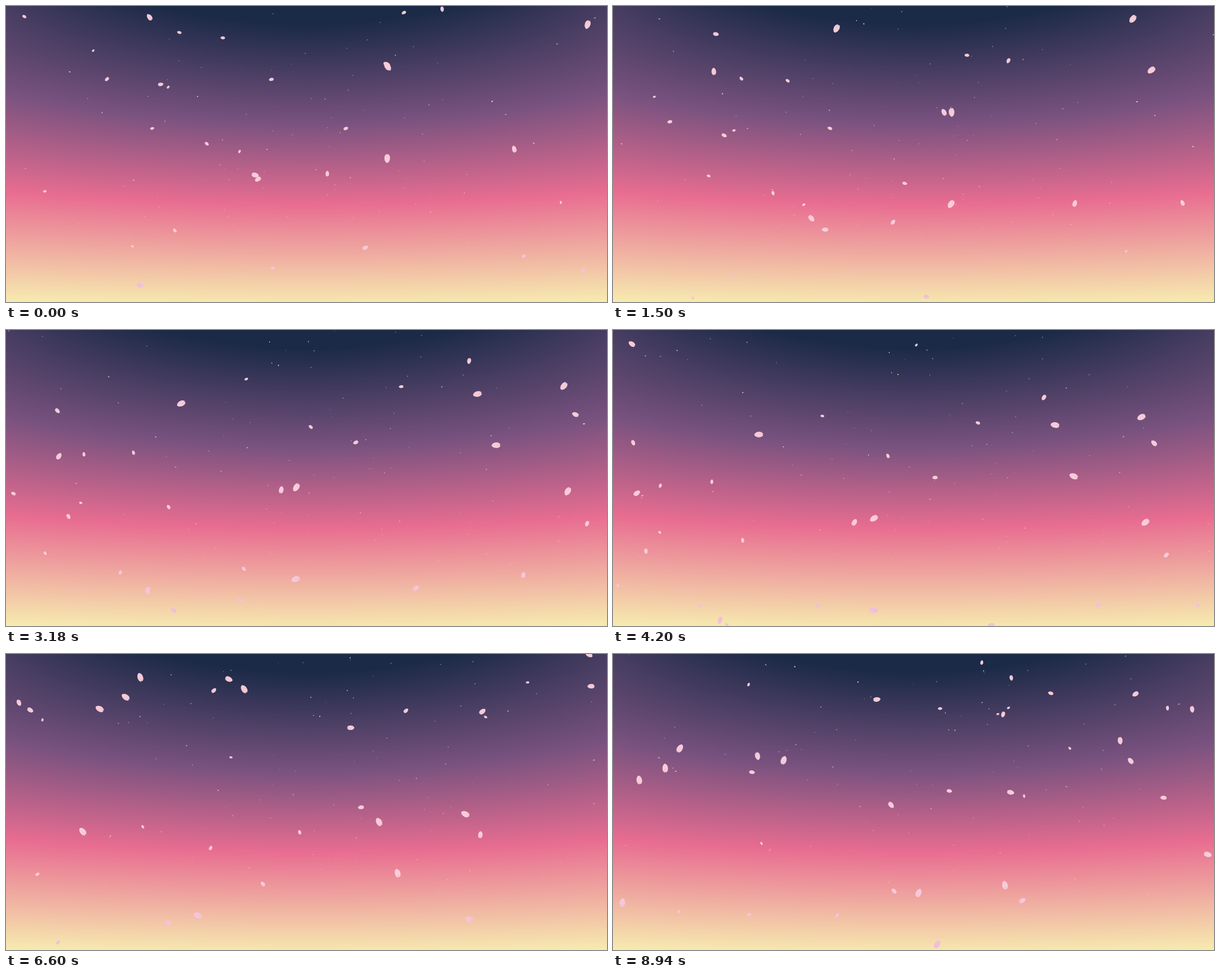
Animation of 1065 by 526 pixels, one loop 9 s. Source, as an HTML page with a canvas:

```html
<!DOCTYPE html>
<html lang="en">
<head>
<meta charset="utf-8">
<title>Petals at dusk</title>
<style>
  html, body { margin: 0; width: 100%; height: 100%; overflow: hidden; background: #1b2a47; }
  canvas { display: block; width: 1065px; height: 526px; }
</style>
</head>
<body>
<canvas id="sky" width="1065" height="526"></canvas>
<script>
const W = 1065, H = 526, CX = W / 2, CY = H / 2;
const LOOP = 9000, STEP = 60, MID = LOOP / 2000;
const FOCAL = CY / Math.tan(37.5 * Math.PI / 180);
const ctx = document.getElementById('sky').getContext('2d');

function seeded(seed) {
  return () => {
    seed = seed + 0x6D2B79F5 | 0;
    let n = Math.imul(seed ^ seed >>> 15, 1 | seed);
    n = n + Math.imul(n ^ n >>> 7, 61 | n) ^ n;
    return ((n ^ n >>> 14) >>> 0) / 4294967296;
  };
}
const rand = seeded(11);
const between = (a, b) => a + (b - a) * rand();
const clamp = v => Math.min(1, Math.max(0, v));

// ---- Sky: a vertical ramp bent upwards at both sides ----
const ramp = [
  { y: 33, rgb: [27, 42, 71] },
  { y: 207, rgb: [121, 82, 127] },
  { y: 352, rgb: [232, 109, 145] },
  { y: 540, rgb: [247, 240, 177] }
];

function rampColor(y) {
  const i = Math.max(1, ramp.findIndex((s, n) => s.y >= y || n === ramp.length - 1));
  const a = ramp[i - 1], b = ramp[i];
  const k = clamp((y - a.y) / (b.y - a.y));
  return a.rgb.map((v, n) => v + (b.rgb[n] - v) * k);
}

function bend(x, y) {
  return 115 * Math.exp(-y / 200) * Math.pow(Math.abs(x - CX) / CX, 1.7);
}

function paintSky() {
  const layer = document.createElement('canvas');
  layer.width = W;
  layer.height = H;
  const c = layer.getContext('2d');
  const img = c.createImageData(W, H);
  let p = 0;
  for (let y = 0; y < H; y++) {
    for (let x = 0; x < W; x++) {
      for (const v of rampColor(y + bend(x, y))) img.data[p++] = Math.round(v);
      img.data[p++] = 255;
    }
  }
  c.putImageData(img, 0, 0);

  // Faint arc across the dome
  c.strokeStyle = 'rgba(115, 105, 160, 0.25)';
  c.lineWidth = 0.8;
  c.beginPath();
  for (let x = 0; x <= W; x += 15) {
    c.lineTo(x, 257.5 - 40 * Math.pow(Math.abs(x - CX - 10) / CX, 1.8));
  }
  c.stroke();
  return layer;
}

// ---- Stars: spread over a sphere that turns about a fixed axis ----
const SPIN = [0.031, 0.0675, 0.012];
const RATE = Math.hypot(...SPIN);
const AXIS = SPIN.map(v => v / RATE);

const stars = Array.from({ length: 640 }, () => {
  const z = between(-1, 1), around = between(0, 2 * Math.PI), r = Math.sqrt(1 - z * z);
  return {
    dir: [r * Math.cos(around), r * Math.sin(around), z],
    size: between(0.45, 0.95),
    alpha: between(0.4, 1),
    warm: rand() < 0.15
  };
});

function turn([x, y, z], angle) {
  const [a, b, c] = AXIS, cos = Math.cos(angle), sin = Math.sin(angle);
  const k = (a * x + b * y + c * z) * (1 - cos);
  return [
    x * cos + (b * z - c * y) * sin + a * k,
    y * cos + (c * x - a * z) * sin + b * k,
    z * cos + (a * y - b * x) * sin + c * k
  ];
}

function drawStar(star, t) {
  const [x, y, z] = turn(star.dir, RATE * t);
  if (z < 0.05) return;
  const X = x / z, Y = y / z;
  const px = CX + X * FOCAL, py = CY - Y * FOCAL;
  if (px < -4 || px > W + 4 || py < -4 || py > H + 4) return;
  const stretch = 1 + X * X + Y * Y;
  ctx.globalAlpha = star.alpha * clamp((500 - py) / 250);
  ctx.fillStyle = star.warm || stretch > 2.1 ? '#fdf3b0' : '#fdeef0';
  ctx.beginPath();
  ctx.ellipse(px, py, star.size * Math.pow(stretch, 0.65), star.size, Math.atan2(-Y, X), 0, 7);
  ctx.fill();
}

// ---- Petals: all drift down and left; positions are those at mid-loop ----
const nearest = [
  [447, 351], [801, 276], [446, 514], [928, 358], [921, 171], [768, 185],
  [273, -16], [319, -37], [345, -72], [529, -51], [243, 202]
].map(([x, y]) => ({ x, y, vx: -51, vy: 54, size: 8, angle: between(-30, 30) }));

const others = Array.from({ length: 78 }, () => ({
  x: between(-240, W + 240),
  y: between(-250, H + 250),
  vx: between(-60, -47),
  vy: between(50, 66),
  size: 2.8 + 4.6 * rand(),
  angle: between(0, 360)
}));
const petals = [...others.sort((a, b) => a.size - b.size), ...nearest];

// Unit petal: rounded base on the left, notched tip on the right
const shape = new Path2D(
  'M-1 .05C-.8-.5-.2-.68.35-.6C.7-.55.9-.34.98-.12L.8-.02L1 .14' +
  'C.85.42.55.62.1.62C-.45.62-.85.42-1 .05Z');
const veins = new Path2D('M.8-.02L.2 0M.75-.3L.35-.2M.75 .3L.35 .2');

function drawPetal(p, t) {
  const x = p.x + p.vx * (t - MID), y = p.y + p.vy * (t - MID);
  if (x < -12 || x > W + 12 || y < -12 || y > H + 12) return;
  const low = clamp((y - 380) / 120);
  ctx.save();
  ctx.translate(x, y);
  ctx.rotate((p.angle + 22 * (t - MID)) * Math.PI / 180);
  ctx.scale(p.size, p.size);
  ctx.globalAlpha = 0.97;
  ctx.fillStyle = `rgb(${250 - 9 * low}, ${208 - 16 * low}, ${220 - 2 * low})`;
  ctx.fill(shape);
  ctx.globalAlpha = 0.45;
  ctx.strokeStyle = '#eda3bf';
  ctx.lineWidth = 0.07;
  ctx.stroke(veins);
  ctx.restore();
}

const sky = paintSky();
let start;

function frame(now) {
  if (start === undefined) start = now;
  const t = Math.floor(((now - start) % LOOP) / STEP) * STEP / 1000;
  ctx.globalAlpha = 1;
  ctx.drawImage(sky, 0, 0);
  for (const s of stars) drawStar(s, t);
  for (const p of petals) drawPetal(p, t);
  requestAnimationFrame(frame);
}
requestAnimationFrame(frame);
</script>
</body>
</html>
```
